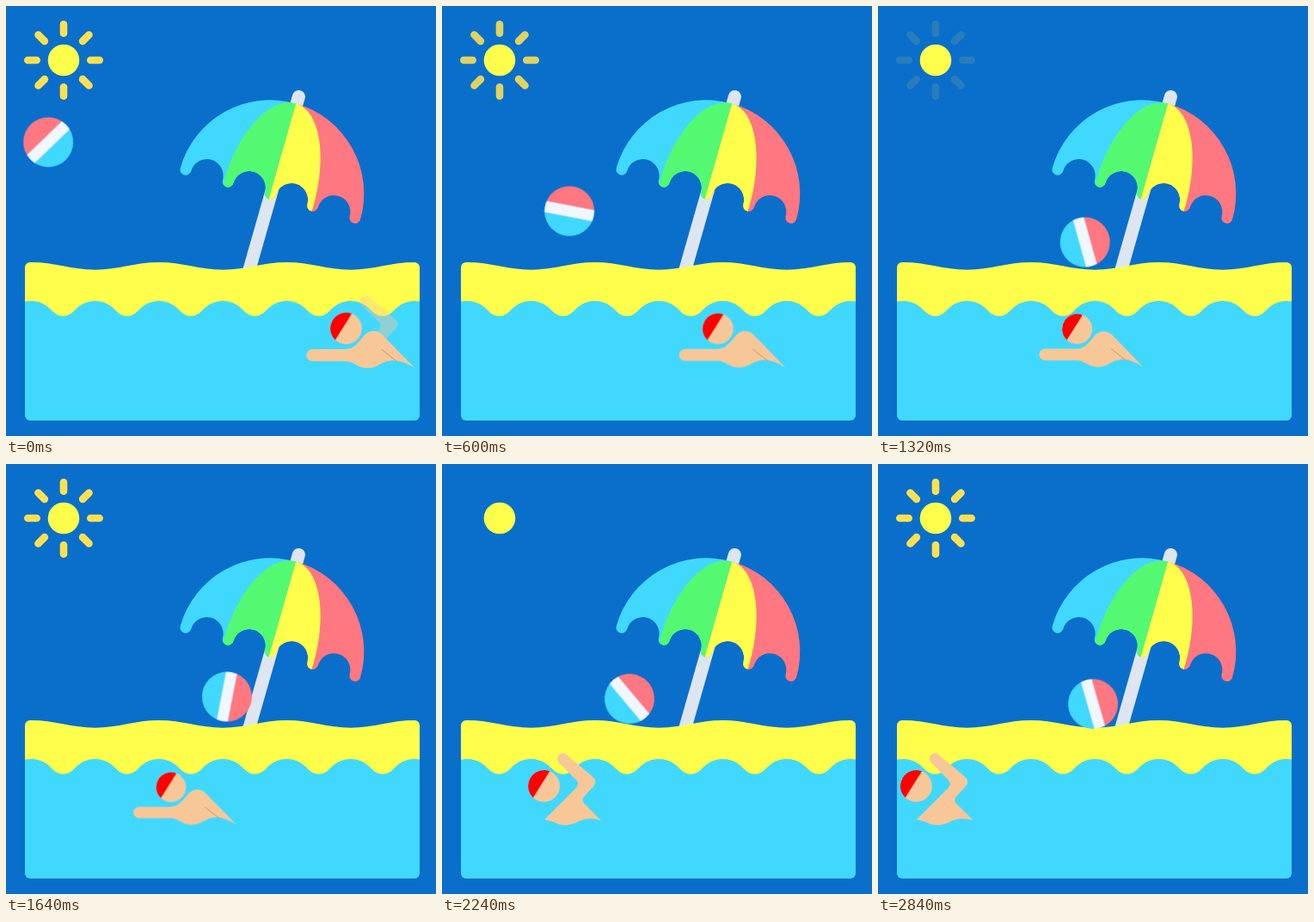
Recreate the animation shown at these times as an HTML page. Size 500 by 500 pixels, loop 2.88 s.

```html
<!DOCTYPE html>
<html lang="en">
<head>
<meta charset="utf-8">
<title>Beach</title>
<style>
  html, body { margin: 0; height: 100%; overflow: hidden; background: #0a6fcb; }
  svg { display: block; width: 100vw; height: 100vh; }

  .rays { stroke: #ffe150; stroke-width: 8.6; stroke-linecap: round; animation: blink 960ms linear infinite; }
  .ball-x, .ball-y, .spin, .glide, .stroke, .glide-show, .stroke-show {
    animation: 2880ms linear infinite;
  }
  .ball-x { animation-name: ball-x; }
  .ball-y { animation-name: ball-y; }
  .spin { animation-name: spin; }
  .glide { animation-name: glide; }
  .stroke { animation-name: stroke; }
  .glide-show { animation-name: glide-show; }
  .stroke-show { animation-name: stroke-show; }

  @keyframes blink {
    0%, 66.667%, 100% { opacity: 1; }
    33.333% { opacity: 0; }
  }

  @keyframes ball-x {
    0% { transform: translateX(49px); }
    12.5% { transform: translateX(111px); }
    20.83% { transform: translateX(148px); }
    36.11% { transform: translateX(209px); animation-timing-function: cubic-bezier(.3, .51, .6, .9); }
    56.94% { transform: translateX(257px); animation-timing-function: cubic-bezier(.3, .42, .6, .9); }
    77.78% { transform: translateX(218px); animation-timing-function: ease-in-out; }
    95.83%, 100% { transform: translateX(250px); }
  }

  /* Each hop: fall with ease-in, rise with ease-out */
  @keyframes ball-y {
    0%, 20.5%, 32%, 41.8%, 52.1% { animation-timing-function: cubic-bezier(.33, 0, .67, .33); }
    12.7%, 27.1%, 37.4%, 46.5% { animation-timing-function: cubic-bezier(.33, .67, .67, 1); }
    0% { transform: translateY(158px); }
    12.7% { transform: translateY(277px); }
    20.5% { transform: translateY(236.7px); }
    27.1% { transform: translateY(269px); }
    32% { transform: translateY(251.5px); }
    37.4% { transform: translateY(273px); }
    41.8% { transform: translateY(259px); }
    46.5% { transform: translateY(277px); }
    52.1% { transform: translateY(263px); }
    61.1% { transform: translateY(277px); }
    77.78% { transform: translateY(273px); animation-timing-function: ease-in-out; }
    95.83%, 100% { transform: translateY(279px); }
  }

  @keyframes spin {
    0% { transform: rotate(-44deg); }
    36.11% { transform: rotate(51deg); }
    56.94% { transform: rotate(101deg); }
    77.78% { transform: rotate(50deg); animation-timing-function: ease-in-out; }
    95.83%, 100% { transform: rotate(74deg); }
  }

  @keyframes glide {
    from { transform: translate(412px, 390px) scale(1); }
    to { transform: translate(53.4px, 390px) scale(.916); }
  }
  @keyframes stroke {
    from { transform: translateX(351.4px); }
    to { transform: translateX(-5px); }
  }
  @keyframes glide-show {
    0%, 65.3% { opacity: 1; }
    68%, 99.9% { opacity: 0; }
    100% { opacity: 1; }
  }
  @keyframes stroke-show {
    0% { opacity: .42; }
    2.8%, 65.3% { opacity: 0; }
    68%, 99.9% { opacity: 1; }
    100% { opacity: .42; }
  }
</style>
</head>
<body>
<svg viewBox="0 0 500 500">
  <defs>
    <clipPath id="box"><rect x="22" y="298" width="459" height="184" rx="6"/></clipPath>
    <clipPath id="disc"><circle r="29"/></clipPath>
    <clipPath id="canopy"><path id="canopy-path"/></clipPath>
    <g id="head">
      <circle r="18.2" fill="#f8c797"/>
      <path d="M6.5-17A18.2 18.2 0 0 0-12.5 13.2Z" fill="#f00"/>
    </g>
  </defs>

  <g transform="translate(67 63)">
    <g class="rays" id="rays"></g>
    <circle r="18.3" fill="#ffff4b"/>
  </g>

  <path d="M340.4 105.4L282.5 308" stroke="#dde6f0" stroke-width="15" stroke-linecap="round"/>
  <g transform="translate(307.4 218.2) rotate(15.9)">
    <g clip-path="url(#canopy)">
      <rect x="-112" y="-112" width="112" height="124" fill="#41d8ff"/>
      <rect y="-112" width="112" height="124" fill="#ff7780"/>
      <path d="M0-109A56 109 0 0 0-56 0V12H0Z" fill="#53f970"/>
      <path d="M0-109A52 109 0 0 1 52 0V12H0Z" fill="#ffff4b"/>
    </g>
  </g>

  <g clip-path="url(#box)">
    <path id="sand" fill="#ffff4b"/>
    <path id="sea" fill="#41d8ff"/>
  </g>

  <g class="ball-x"><g class="ball-y"><g class="spin">
    <g clip-path="url(#disc)">
      <rect x="-30" y="-30" width="60" height="30" fill="#ff7780"/>
      <rect x="-30" width="60" height="30" fill="#41d8ff"/>
      <rect x="-30" y="-6.5" width="60" height="13" fill="#f0f7ff"/>
    </g>
  </g></g></g>

  <g class="stroke-show"><g class="stroke">
    <path fill="#f8c797" d="M70 337.500L101 363.500Q107 369 102 375L90.500 387.500Q88 391 91 394.500L111 414.500Q96 410 86 415Q77 420 68 420Q61 419.500 55 416Q50 414 45 413.500L82 376.500Q86 372 82 367.500L62 347.500Q58 342.500 62 338Q66 334.500 70 337.500Z"/>
    <use href="#head" transform="translate(44.500 374.500) scale(1.015)"/>
  </g></g>

  <g class="glide-show"><g class="glide">
    <g transform="translate(-367.6 -390)">
      <path fill="#f8c797" d="M312 399H350C361 399 366 390 373 382Q383 373.500 393 382L431 421Q416 411 404 412C392 413 388 421 376 421C364 421 361 413 350 413H312A7 7 0 0 1 312 399Z"/>
      <path d="M392 399L410 413" stroke="#b08e6c" stroke-width=".8"/>
      <use href="#head" transform="translate(351 375)"/>
    </g>
  </g></g>
</svg>
<script>
  const byId = id => document.getElementById(id);

  byId('rays').innerHTML = Array.from({ length: 8 }, (_, i) =>
    `<path d="M0-31.300V-41.700" transform="rotate(${i * 45})"/>`).join('');

  // Half dome whose lower edge alternates rounded tips and scallops
  const gap = 51.2, tip = 6.5, bite = gap / 2 - tip, dome = 2 * gap + tip;
  let canopy = `M${-dome} 0A${dome} ${dome} 0 0 1 ${dome} 0`;
  for (let i = 0; i < 5; i++) {
    canopy += `a${tip} ${tip} 0 0 1 ${-2 * tip} 0`;
    if (i < 4) canopy += `a${bite} ${bite} 0 0 0 ${-2 * bite} 0`;
  }
  byId('canopy-path').setAttribute('d', canopy + 'Z');

  const repeat = (n, part) => part.repeat(n);
  byId('sand').setAttribute('d', 'M20 298h9.300' +
    repeat(3, 'c27 0 47 8.700 74.300 8.700s47-8.700 74.300-8.700') + 'h10V400H20Z');
  byId('sea').setAttribute('d', 'M-45 343' +
    repeat(8, 'c13 0 20 7 24.500 11.500c4 4 8 6 12.650 6s8.650-2 12.650-6c4.500-4.500 11.500-11.500 24.500-11.500') + 'V490H-45Z');
</script>
</body>
</html>
```
